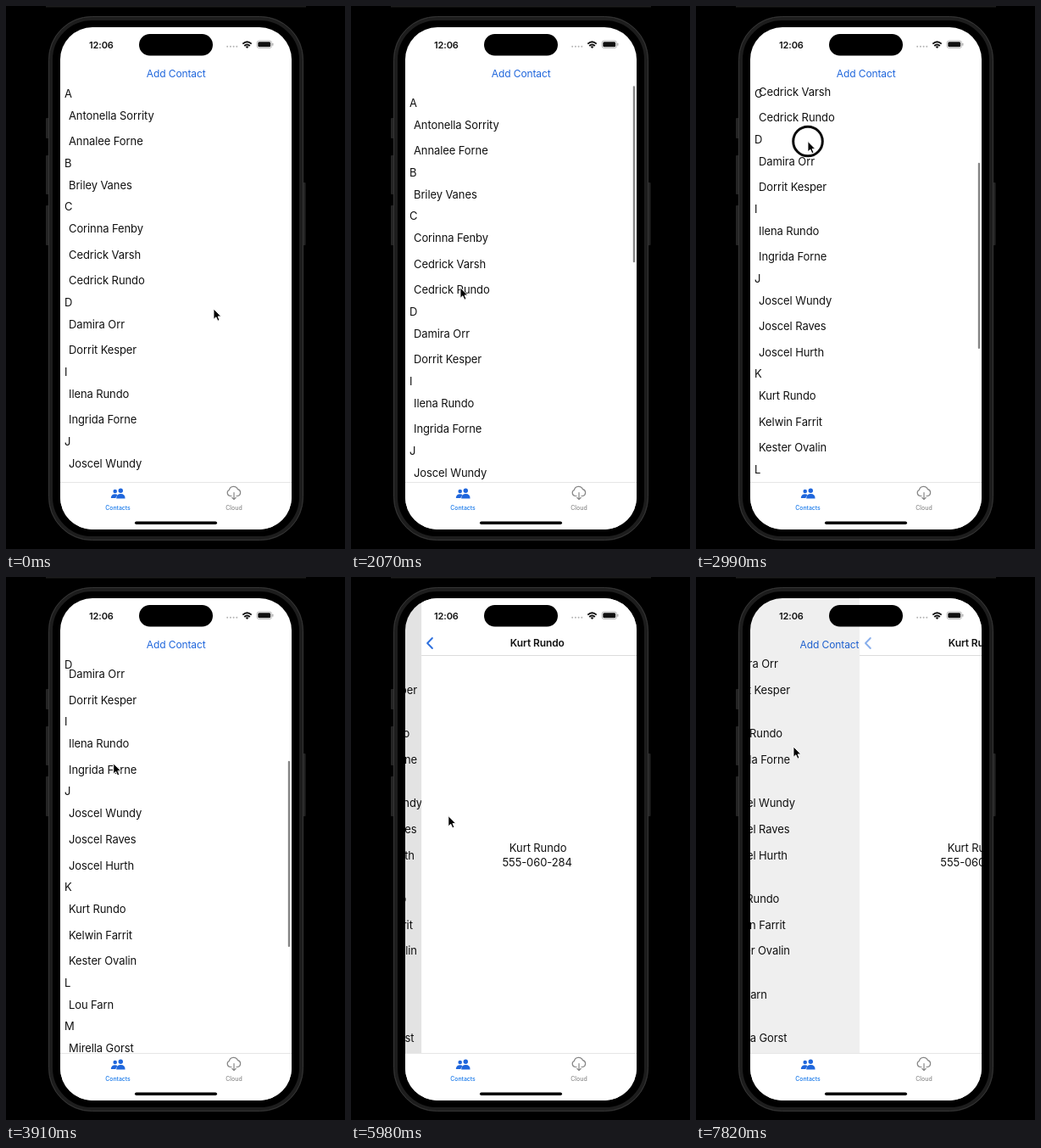
Write an HTML page that moves like this. It is 400x640 px and loops after 8 s.

```html
<!DOCTYPE html>
<html lang="en">
<head>
<meta charset="utf-8">
<title>Contacts</title>
<style>
  html, body { margin: 0; width: 100%; height: 100%; overflow: hidden; background: #000; }
  svg { display: block; width: 400px; height: 640px; }
  text { font: 13px Inter, sans-serif; letter-spacing: -0.1px; fill: #111; }
  .mid { text-anchor: middle; }
  .bar { font-size: 12px; }
  .bold { font-weight: 600; }
  .tab { font-size: 6.9px; font-weight: 500; letter-spacing: 0; }
  .blue { fill: #1f66dc; }
  .line { fill: none; stroke-linecap: round; stroke-linejoin: round; }
</style>
</head>
<body>
<svg viewBox="0 0 400 640">
  <defs>
    <clipPath id="screen"><rect x="64" y="25" width="273" height="592" rx="38"/></clipPath>
    <clipPath id="listArea"><rect x="64" y="92.6" width="273" height="469"/></clipPath>
  </defs>

  <!-- phone body -->
  <rect width="400" height="640"/>
  <rect x="47" width="307" height="1.5" fill="#1c1c1c"/>
  <g fill="#242424">
    <rect x="47" y="132" width="4" height="24" rx="1"/>
    <rect x="47" y="176" width="4" height="46" rx="1"/>
    <rect x="47" y="235" width="4" height="47" rx="1"/>
    <rect x="349.500" y="208" width="4" height="74" rx="1"/>
  </g>
  <rect x="52.500" y="14.500" width="296" height="613" rx="49" stroke="#1d1d1d" stroke-width="5"/>
  <rect x="50.500" y="12.500" width="300" height="617" rx="51" fill="none" stroke="#353535"/>

  <g clip-path="url(#screen)">
    <rect x="64" y="25" width="273" height="592" fill="#fff"/>

    <g id="listPage">
      <text class="mid bar blue" x="200.700" y="83.700">Add Contact</text>
      <g clip-path="url(#listArea)">
        <g id="rows"></g>
        <g id="headers"></g>
        <rect id="indicator" x="332.800" width="2.200" rx="1.100" fill="#858585"/>
      </g>
    </g>
    <rect id="dim" x="64" y="25" width="273" height="537"/>

    <g id="detailPage">
      <rect x="64" y="25" width="273" height="537" fill="#fff"/>
      <rect x="64" y="92" width="273" height="1" fill="#dcdcdc"/>
      <path id="back" class="line" d="M76.800 72L71 78L76.800 84" stroke="#1f66dc" stroke-width="1.900"/>
      <text class="mid bar bold" x="200.700" y="82">Kurt Rundo</text>
      <text class="mid" x="201.500" y="324">Kurt Rundo</text>
      <text class="mid" x="200.500" y="341">555-060-284</text>
    </g>

    <!-- status bar -->
    <text class="bold" x="98" y="49.500" style="font-size:11px">12:06</text>
    <rect x="157" y="33" width="87" height="25.500" rx="12.750"/>
    <path class="line" d="M261.200 47.800H273" stroke="#b4b4b4" stroke-width="2" stroke-dasharray="0 3.700"/>
    <g class="line" stroke="#111" stroke-width="1.900" style="stroke-linecap:butt">
      <path d="M279.300 44.600Q284.500 39.700 289.700 44.600M281.200 47Q284.500 43.900 287.800 47"/>
    </g>
    <path d="M282.600 48Q284.500 46.500 286.400 48L284.500 50Z" fill="#111"/>
    <rect x="296" y="41" width="17.500" height="8.600" rx="2.600" fill="none" stroke="#aaa" stroke-width=".8"/>
    <rect x="297.300" y="42.300" width="14.900" height="6" rx="1.500" fill="#111"/>
    <rect x="314.300" y="43.800" width="1.100" height="3" rx=".5" fill="#aaa"/>

    <!-- tab bar -->
    <rect x="64" y="561" width="273" height="56" fill="#fff"/>
    <rect x="64" y="561" width="273" height="1" fill="#e6e6e6"/>
    <g class="blue">
      <circle cx="128.700" cy="572" r="2.300"/>
      <path d="M123.800 580Q124 575.300 128.700 575.300Q131 575.300 131.500 576.500Q129.600 578 129.400 580Z"/>
      <circle cx="135.300" cy="571.300" r="2.700"/>
      <path d="M130.200 580.500Q130.200 575 135.400 575Q140.600 575 140.600 580.500Z"/>
    </g>
    <text class="tab mid" x="132" y="594" style="fill:#1678ea">Contacts</text>
    <g class="line" stroke="#858585" stroke-width="1.200">
      <path d="M266 577.500H264.500A3.700 3.700 0 0 1 263.300 570.500A5.400 5.400 0 0 1 273.500 569.700A4 4 0 0 1 273.500 577.500H272"/>
      <path d="M269 573.500V581.500M266.700 579.300L269 581.600L271.300 579.300"/>
    </g>
    <text class="tab mid" x="269" y="594" style="fill:#8a8a8a">Cloud</text>
    <rect x="152" y="607.500" width="97" height="3.500" rx="1.750"/>
  </g>

  <g id="pointer">
    <circle id="ring" r="17.300" fill="none" stroke="#0a0a0a" stroke-width="3"/>
    <path d="M0 0V12.300L2.900 9.700L4.900 14.200L7 13.300L5.100 8.900H8.800Z" stroke="#fff" stroke-width=".9"/>
  </g>
</svg>

<script>
const LOOP = 8000, STEP = 230;
const TOP = 92.6, HEADER = 20.8, ROW = 30.6, WIDTH = 273;
const VIEW = 466, CONTENT = 990;

const people = [
  "Antonella Sorrity", "Annalee Forne", "Briley Vanes", "Corinna Fenby",
  "Cedrick Varsh", "Cedrick Rundo", "Damira Orr", "Dorrit Kesper",
  "Ilena Rundo", "Ingrida Forne", "Joscel Wundy", "Joscel Raves",
  "Joscel Hurth", "Kurt Rundo", "Kelwin Farrit", "Kester Ovalin",
  "Lou Farn", "Mirella Gorst"
];

// Each key is [time, value, ...].
const cursorKeys = [
  [0, 245, 357], [300, 235, 340], [800, 108, 200], [920, 107, 188],
  [1380, 109, 268], [1840, 127, 336], [2070, 129, 332], [2450, 132, 350],
  [2760, 133, 262], [2990, 132, 159.5], [3220, 131, 128], [3600, 128, 150],
  [4600, 124, 375], [5060, 123, 381], [5750, 123, 381], [6400, 100, 100],
  [6900, 94, 74], [7360, 76, 76], [7590, 77, 80], [7820, 115, 200]
];
const scrollKeys = [
  [920, 0], [1380, 40], [1610, 58], [1840, 60], [2070, 11.3], [2300, 1],
  [2530, -5], [2760, -92], [2990, -192], [3220, -224]
];
const pushKeys = [[5600, 0], [5750, .35], [5980, .93], [6210, 1], [7590, 1], [7820, .5275]];
const indicatorKeys = [[900, 0], [920, 1], [5200, 1], [5600, 0]];
const presses = [[920, 1800], [2450, 3100], [5290, 5500], [7300, 7500]];

const el = id => document.getElementById(id);
const shift = (node, x, y) => node.setAttribute("transform", `translate(${x} ${y})`);

function track(keys, t) {
  const next = keys.findIndex(key => key[0] > t);
  if (next <= 0) return keys.at(next).slice(1);
  const a = keys[next - 1], b = keys[next];
  const k = (t - a[0]) / (b[0] - a[0]);
  return a.slice(1).map((v, i) => v + (b[i + 1] - v) * k);
}

function addText(parent, content, x, y) {
  const node = document.createElementNS("http://www.w3.org/2000/svg", "text");
  node.textContent = content;
  node.setAttribute("x", x);
  node.setAttribute("y", y);
  return parent.appendChild(node);
}

const sections = [];
let y = TOP;
for (const name of people) {
  if (sections.at(-1)?.letter !== name[0]) {
    const node = addText(el("headers"), name[0], 69, 15);
    sections.push({ letter: name[0], node, top: y });
    y += HEADER;
  }
  addText(el("rows"), name, 74, y + 20.2);
  y += ROW;
  sections.at(-1).end = y;
}

function scrollAt(t) {
  return t < 3220 ? track(scrollKeys, t)[0] : -272.3 + 48.3 * Math.exp((3220 - t) / 500);
}

function draw(t) {
  const scroll = scrollAt(t);
  shift(el("rows"), 0, scroll);
  for (const { node, top, end } of sections) {
    const pinned = Math.min(Math.max(top + scroll, TOP), end + scroll - HEADER);
    shift(node, 0, pinned);
  }

  const indicator = el("indicator");
  const ratio = VIEW / CONTENT;
  indicator.setAttribute("y", 94.3 + Math.max(0, -scroll) * ratio);
  indicator.setAttribute("height", VIEW * ratio - Math.max(0, scroll));
  indicator.setAttribute("opacity", track(indicatorKeys, t)[0]);

  const [push] = track(pushKeys, t);
  shift(el("listPage"), -0.3 * WIDTH * push, 0);
  shift(el("detailPage"), WIDTH * (1 - push), 0);
  el("dim").setAttribute("opacity", 0.12 * push);
  el("back").setAttribute("opacity", push);

  shift(el("pointer"), ...track(cursorKeys, t));
  const pressed = presses.some(([from, to]) => t >= from && t < to);
  el("ring").setAttribute("visibility", pressed ? "visible" : "hidden");
}

function tick() {
  const t = performance.now() % LOOP;
  draw(Math.floor(t / STEP) * STEP);
  requestAnimationFrame(tick);
}
tick();
</script>
</body>
</html>
```
